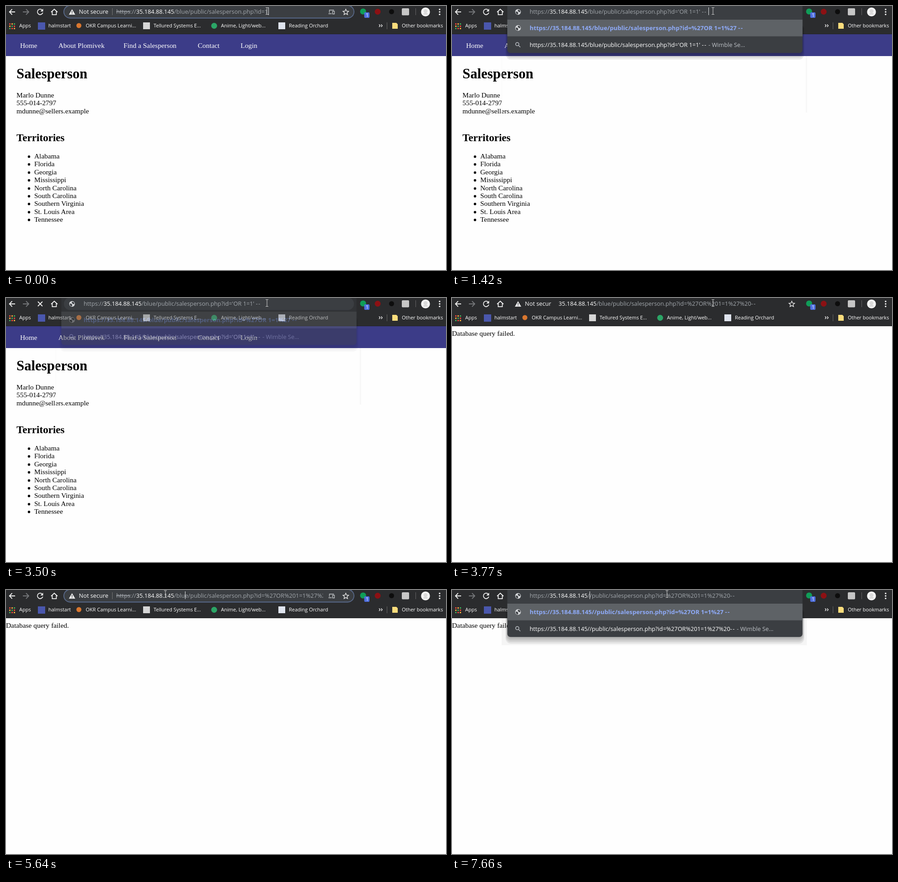
Write an HTML page that moves like this. It is 966x580 px and loops after 8 s.

```html
<!DOCTYPE html>
<html lang="en">
<head>
<meta charset="utf-8">
<title>Salesperson</title>
<style>
html, body { margin: 0; width: 100%; height: 100%; overflow: hidden; background: #fefefe; }
svg { display: block; }
text { white-space: pre; font: 12.8px "Open Sans", "Noto Sans", sans-serif; }
.bm { font-size: 11px; }
.serif { font: 15.4px "Liberation Serif", "Times New Roman", serif; }
.h1 { font: bold 30.8px "Liberation Serif", serif; }
.h2 { font: bold 23.1px "Liberation Serif", serif; }
.b { font-weight: 700; font-size: 13.2px; }
.dash { letter-spacing: 1.5px; }
.line { fill: none; stroke: #f1f1f1; stroke-width: 1.8; }
</style>
</head>
<body>
<svg id="stage" width="966" height="580" viewBox="0 0 966 580"></svg>
<script>
const HOST = '35.184.88.145', FILE = '/public/salesperson.php?id=';
const WHITE = '#fff', GREY = '#a2a7ac', LINK = '#8fabf9', BAR = '#2b2c2e', FIELD = '#3b3e42';

const text = (x, y, s, fill = WHITE, cls = '') => `<text x="${x}" y="${y}" fill="${fill}" class="${cls}">${s}</text>`;
const span = (s, fill = WHITE, cls = '', deco = 'none') =>
  `<tspan fill="${fill}" class="${cls}" text-decoration="${deco}">${s.replace('--', '<tspan class="dash">--</tspan>')}</tspan>`;
const rect = (x, y, w, h, fill, r = 0, more = '') =>
  `<rect x="${x}" y="${y}" width="${w}" height="${h}" rx="${r}" fill="${fill}" ${more}/>`;
const dot = (x, y, r, fill) => `<circle cx="${x}" cy="${y}" r="${r}" fill="${fill}"/>`;
const line = (d, more = '') => `<path class="line" d="${d}" ${more}/>`;

// Each step overrides parts of the state before it.
const ENCODED = '%27OR%201=1%27%20--', TYPED = "'OR 1=1' --";
const steps = [
  [0, { page: 'sales', pill: 1, chip: 'Not secure', x: 242, scheme: 'struck', dir: '/blue',
        query: '1', caret: 576, mouse: [573, 11], drop: 0, rows: 5, halo: 1 }],
  [590, { caret: 0 }],
  [1020, { chip: '', x: 170.5, scheme: 'plain', query: '', caret: 498, drop: .62 }],
  [1140, { drop: 1 }],
  [1420, { query: TYPED, caret: 563, rows: 2, halo: 0, trail: 1 }],
  [1950, { caret: 0 }],
  [2540, { caret: 563 }],
  [3070, { caret: 0 }],
  [3500, { drop: .4, loading: 1 }],
  [3620, { drop: 0, pill: 0, scheme: '', query: ENCODED }],
  [3770, { page: 'failed', loading: 0, trail: 0, chip: 'Not secur', x: 234 }],
  [3920, { chip: 'Not secure', x: 242 }],
  [4320, { mouse: [535, 22] }],
  [4440, { mouse: [480, 34] }],
  [4560, { mouse: [425, 24] }],
  [4680, { mouse: [393, 14] }],
  [4830, { mouse: [370, 10] }],
  [4980, { mouse: [350, 9], pill: 1 }],
  [5100, { selected: 1 }],
  [5250, { selected: 0, caret: 350 }],
  [5640, { scheme: 'struck', caret: 393 }],
  [5880, { mouse: [358, 10] }],
  [6030, { mouse: [459, 10] }],
  [6180, { mouse: [472, 9], caret: 399 }],
  [6740, { caret: 0 }],
  [6990, { chip: '', x: 170.5, scheme: 'plain', dir: '/blu', caret: 321, drop: .62, halo: 1 }],
  [7110, { dir: '/bl', caret: 313, drop: 1 }],
  [7380, { dir: '/b', caret: 309 }],
  [7660, { dir: '/', caret: 302 }],
];

function salesPage() {
  const nav = [[31, 'Home'], [115, 'About Plomivek'], [258, 'Find a Salesperson'], [421, 'Contact'], [515, 'Login']];
  const states = ['Alabama', 'Florida', 'Georgia', 'Mississippi', 'North Carolina', 'South Carolina',
    'Southern Virginia', 'St. Louis Area', 'Tennessee'];
  const row = (y, i) => Math.round(y + i * 17.4);
  return rect(0, 62, 966, 48, '#3c3c88') +
    nav.map(([x, s]) => text(x, 92, s, WHITE, 'serif')).join('') +
    text(23, 158.5, 'Salesperson', '#000', 'h1') +
    ['Marlo Dunne', '555-014-2797', 'mdunne@sellers.example']
      .map((s, i) => text(23, row(201, i), s, '#000', 'serif')).join('') +
    text(23, 297, 'Territories', '#000', 'h2') +
    states.map((s, i) => dot(50.5, row(331, i), 2.7, '#000') + text(62, row(335, i), s, '#000', 'serif')).join('');
}

function bookmarks() {
  let apps = '';
  for (let i = 0; i < 9; i++)
    apps += rect(7 + i % 3 * 5, 38 + (i / 3 | 0) * 5, 3, 3, ['#e8453c', '#f2a33a', '#3fa757'][(i + (i / 3 | 0)) % 3]);
  const labels = [[29, 'Apps'], [93, 'halmstart'], [175, 'OKR Campus Learni...'], [324, 'Tellured Systems E...'],
    [472, 'Anime, Light/web...'], [621, 'Reading Orchard'], [869, 'Other bookmarks']];
  return apps + rect(70, 36, 16, 16, '#4a57ad') + dot(160, 43, 5.5, '#d9772f') + rect(301, 36, 15, 15, '#d6d6d6') +
    dot(457, 43.5, 6.5, '#2ba566') + rect(598, 36, 15, 15, '#dfe4ee') +
    labels.map(([x, s]) => text(x, 47.3, s, WHITE, 'bm')).join('') +
    line('M819 40.5l2.5 2.7-2.5 2.7M823.5 40.5l2.5 2.7-2.5 2.7', 'style="stroke-width:1.4"') +
    rect(836, 36, 1, 15, '#666') + '<path d="M848 37h9l3 3v10h-12z" fill="#fbdc7c"/>';
}

function buttons(loading) {
  return line('M20 13H8M13.5 7L7.5 13l6 6') +
    line('M37 13H49M44 7l6 6-6 6', 'style="stroke:#76787b"') +
    (loading ? line('M70 8l10 10M80 8l-10 10')
             : line('M79.5 9a6 6 0 1 0 1.3 5.5') + '<path d="M81.5 6v6h-6z" fill="#f1f1f1"/>') +
    line('M99 13.5l7-6.5 7 6.5M101.5 12v7.2h9V12') +
    dot(784, 12, 6.6, '#109d58') + rect(786.5, 14, 11.5, 12, '#4f6fe0', 2) + text(789.8, 23.6, '1', WHITE, 'bm') +
    dot(816, 12.5, 6.5, '#8c1114') + dot(846.5, 12.5, 5.5, '#0d0d0d') + rect(869, 5, 16, 15.5, '#c6c6c6', 2) +
    rect(899, 5, 1, 15, '#666') + dot(921, 13, 9.8, '#f4f4f4') +
    '<path d="M916 19q0-3 3-4a4.2 4.2 0 1 1 4 0q3 1 3 4z" fill="#dadada"/>' +
    [7.5, 13, 18.5].map(y => dot(952, y, 1.7, '#f1f1f1')).join('');
}

const globe = y => dot(145, y, 6.2, '#d5d7da') +
  `<path d="M140 ${y - 1}l4 1 1.5 2.5-1.5 3q-4-1-4-6.5M145 ${y - 5}l4.5 1.5 .5 4-3-.5-2.5-2z" fill="${FIELD}"/>`;
const lens = y => `<g fill="none" stroke="#bdc1c6" stroke-width="1.5"><circle cx="143.3" cy="${y - 1.2}" r="3.6"/>` +
  `<path d="M146 ${y + 1.5}l4 4"/></g>`;

function dropdown(s) {
  const base = `https://${HOST}${s.dir}${FILE}`, root = base.slice(0, -1);
  const person = (name, id) => span('Salesperson', WHITE, 'b') + span(': ' + name) + span(' - ', '#bdc1c6') +
    span(root, LINK, 'b') + span('=' + id, LINK);
  const items = [
    span(base + (s.query ? '%27OR 1=1%27 --' : ''), LINK, 'b'),
    span(base + s.query) + span(' - Wimble Se...', '#bdc1c6'),
    span(root, LINK, 'b') + span('=%27OR 1=1%27 --', LINK),
    person('Marlo Dunne', 1),
    person('Annabella Orton', 6),
  ].slice(0, s.rows);
  const h = 30 + 36.65 * s.rows;
  const shadow = [4, 3, 2, 1].map(k =>
    rect(121.5 - k, 40, 648 + 2 * k, h - 40 + 3.6 * k, '#000', 8 + k, 'opacity=".075"')).join('');
  return (s.halo ? rect(109, 62, 670, h - 44, '#000', 0, 'opacity=".035"') : '') +
    `<g opacity="${s.drop}">` + shadow +
    rect(121.5, -10, 648, h + 10, FIELD, 7) + rect(121.5, 30, 648, 36.65, '#5e6266') +
    items.map((row, i) => {
      const y = 48.3 + i * 36.65;
      return (i === 1 ? lens(y) : globe(y)) + text(170.5, Math.round(y + 4.8), row);
    }).join('') + '</g>';
}

function address(s) {
  let out = '';
  if (s.chip) {
    out += '<path d="M145 7l7 12h-14z" fill="#f1f1f1"/>' + rect(144.3, 11, 1.5, 4, FIELD) + rect(144.3, 16, 1.5, 1.5, FIELD) +
      text(160, 17.2, s.chip);
    if (s.chip === 'Not secure') out += rect(233, 5, 1, 15, '#777');
  } else out += globe(13);
  if (!s.drop) {
    out += line('M746 7l1.8 4.2 4.5.4-3.4 3 1 4.4-3.9-2.4-3.9 2.4 1-4.4-3.4-3 4.5-.4z', 'style="stroke-width:1.3"');
    if (s.pill) out += line('M710 15V9h10M708 17h7M717 11.5h4v6h-4z', 'style="stroke-width:1.3;stroke:#c4c7ca"');
  }
  if (s.selected) out += rect(242, 3, 437, 19, '#4a78b8');
  const scheme = !s.scheme ? '' :
    s.scheme === 'struck' ? span('https', GREY, '', 'line-through') + span('://', GREY) : span('https://', GREY);
  out += '<g clip-path="url(#field)">' +
    text(s.x, 17.2, scheme + span(HOST) + span(s.dir + FILE + s.query, s.selected ? WHITE : GREY)) + '</g>';
  if (s.caret) out += rect(s.caret, 3, 1, 17, '#e8eaed');
  return out;
}

function draw(s) {
  const [mx, my] = s.mouse;
  return '<clipPath id="field"><rect x="160" width="536" height="30"/></clipPath>' +
    rect(0, 0, 966, 580, '#fefefe') +
    (s.page === 'sales' ? salesPage() : text(0, 83, 'Database query failed.', '#000', 'serif')) +
    (s.trail ? rect(109, 110, 1, 124, '#f7f7f7') + rect(776.5, 110, 3, 124, '#f7f7f7') : '') +
    rect(0, 0, 966, 62, BAR) + rect(0, 61, 966, 1, '#242527') + bookmarks() + buttons(s.loading) +
    (s.pill ? rect(127, -1, 637, 27.5, FIELD, 13.7, s.drop ? '' : 'stroke="#596a8c" stroke-width="1.8"') : '') +
    (s.drop ? dropdown(s) : '') + address(s) +
    line(`M${mx - 3} ${my - 7.5}h2.5l.5 .5 .5-.5h2.5M${mx} ${my - 7}v14M${mx - 3} ${my + 7.5}h2.5l.5-.5 .5 .5h2.5`,
      'style="stroke-width:1.1;stroke:#c8c8c8"');
}

const stage = document.getElementById('stage');
let shown = -1;
function tick() {
  const t = performance.now() % 8000;
  const count = steps.filter(([start]) => start <= t).length;
  if (count !== shown) {
    shown = count;
    stage.innerHTML = draw(Object.assign({}, ...steps.slice(0, count).map(step => step[1])));
  }
  requestAnimationFrame(tick);
}
tick();
</script>
</body>
</html>
```
